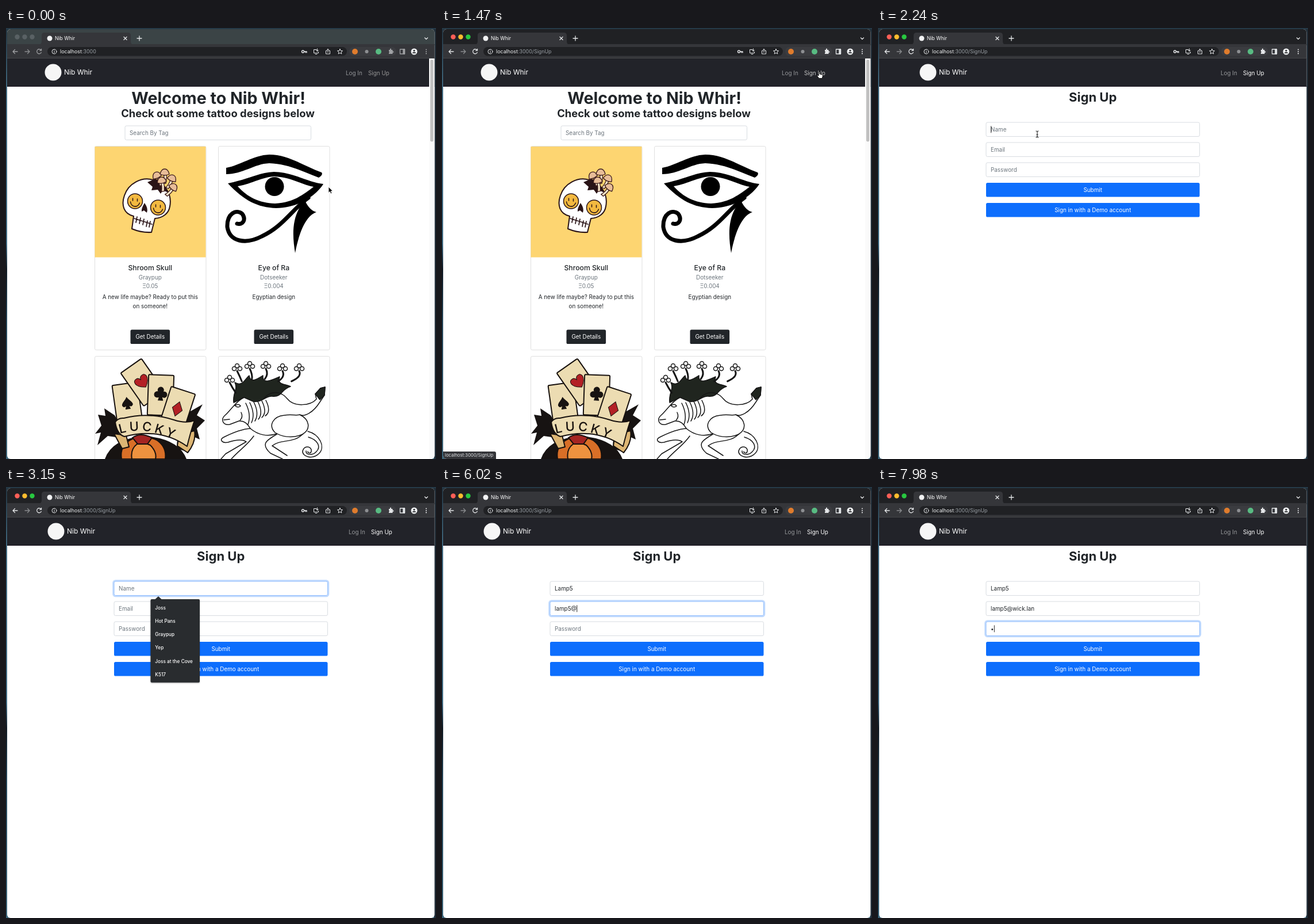
Recreate the animation shown at these times as an HTML page. Size 748 px wide and 749 px high, loop 8000 ms.

```html
<!DOCTYPE html>
<html lang="en">
<head>
<meta charset="utf-8">
<title>Nib Whir</title>
<style>
html, body { margin: 0; width: 100%; height: 100%; overflow: hidden; background: #1c2a34; }
svg { display: block; width: 748px; height: 749px; }
text { font: 9.9px Inter, "Open Sans", sans-serif; fill: #212529; white-space: pre; }
.mid { text-anchor: middle; }
.bold { font-weight: 700; }
.title { font-size: 12.2px; font-weight: 500; }
.muted { fill: #6c757d; }
.light { fill: #fff; }
.small { font-size: 8.25px; font-weight: 500; fill: #fff; }
.icon { fill: none; stroke: #e4e6e8; stroke-width: 1.3; stroke-linecap: round; stroke-linejoin: round; }
.field { fill: #fff; stroke: #ced4da; stroke-width: .8; }
.ink { fill: none; stroke: #161616; stroke-width: 1.5; stroke-linecap: round; stroke-linejoin: round; }
.paper { fill: #ecdcb2; stroke: #17110e; stroke-width: 2; stroke-linejoin: round; }
.line { fill: none; stroke: #2a1417; stroke-width: 2; stroke-linecap: round; stroke-linejoin: round; }
</style>
</head>
<body>
<svg id="stage" viewBox="0 0 748 749">
  <defs>
    <linearGradient id="desk" x2="0" y2="1">
      <stop offset="0" stop-color="#22333f"/><stop offset=".15" stop-color="#426b82"/>
      <stop offset=".5" stop-color="#3f6a83"/><stop offset=".56" stop-color="#121c25"/>
      <stop offset=".68" stop-color="#25465a"/><stop offset="1" stop-color="#3b6478"/>
    </linearGradient>
    <clipPath id="win"><rect x="2" y="2" width="743.5" height="747" rx="6"/></clipPath>
    <clipPath id="rowTwo"><rect x="154" y="571" width="410" height="178"/></clipPath>
    <path id="arc" d="M198 705Q250 688 316 727"/>
  </defs>
  <rect width="748" height="749" fill="url(#desk)"/>
  <rect x="745" width="3" height="749" fill="#202c36"/>
  <rect width="748" height="2" fill="#253947"/>

  <g clip-path="url(#win)">
    <rect width="748" height="749" fill="#fff"/>
    <rect id="strip" width="748" height="30" fill="#202124"/>
    <path d="M58 29Q62 28 62 23V13Q62 8 67 8H212Q217 8 217 13V23Q217 28 221 29Z" fill="#35363a"/>
    <rect y="28" width="748" height="25" fill="#35363a"/>
    <rect y="52.3" width="748" height=".7" fill="#4b4c50"/>
    <g id="lights"></g>
    <circle cx="76" cy="18" r="4.5" fill="#f2f3f4"/>
    <text x="85" y="21" class="light" style="font-size:8.6px">Nib Whir</text>
    <path class="icon" d="M205 15.5l5 5m0-5l-5 5M228 18h8m-4-4v8M728.500 17l2.500 2.500l2.500-2.500"/>
    <rect x="72" y="33" width="521" height="15.500" rx="7.700" fill="#202124"/>
    <rect x="597" y="33" width="82" height="15.500" rx="7.700" fill="#3b3c40"/>
    <g id="tools" class="icon">
      <path d="M20 41h-8m3.500-3.500L12 41l3.500 3.500"/>
      <path d="M61 38.500a4 4 0 1 0 .3 4M61.500 36.500v2.700h-2.700"/>
      <path d="M666 38h2q-.7-2.500 1-2.500t1 2.500h2.500v2.500q2-.5 2 1t-2 1V45H666v-2q1.800-1 0-2.500Z" fill="#e4e6e8" stroke="none"/>
      <rect x="685.500" y="37" width="8" height="8"/><path d="M691 37h2.500v8H691Z" fill="#e4e6e8"/>
      <path d="M731 37.500v.1m0 3.300v.1m0 3.300v.1" stroke-width="2"/>
    </g>
    <path class="icon" d="M33 41h8m-3.500-3.500L41 41l-3.500 3.500" style="stroke:#898b8e"/>
    <g class="icon" style="stroke-width:1">
      <circle cx="84" cy="41" r="4"/><path d="M84 40.500v2.500m0-4.300v.1"/>
      <path d="M540 37.500h-4.500v6h8v-2M538 45.500h3M541.500 36v4.500m-2-2l2 2l2-2"/>
      <path d="M558 39.500h-1.500v5.500h7v-5.500H562M560 42.500v-6m-2 2l2-2l2 2"/>
      <path d="M581 36.500l1.300 2.900l3.200.3l-2.400 2.100l.7 3.200l-2.800-1.700l-2.800 1.700l.7-3.200l-2.400-2.100l3.200-.3Z"/>
      <path id="key" d="M518.500 41h4.500v1.700m-2-1.700v1.700M518.500 41a2 2 0 1 0-4 0a2 2 0 1 0 4 0" stroke-width="1.400"/>
    </g>
    <circle cx="607" cy="41" r="5" fill="#df7c2d"/>
    <circle cx="627.500" cy="41" r="3" fill="#8d8f92"/>
    <circle cx="648" cy="41" r="5" fill="#58bb82"/>
    <circle cx="710" cy="41" r="5.500" fill="#f1f3f4"/>
    <circle cx="710" cy="39.300" r="1.600" fill="#35363a"/><path d="M707 44q0-2.300 3-2.300t3 2.300Z" fill="#35363a"/>
    <text x="94" y="44.300" style="font-size:8.900px;fill:#9aa0a6"><tspan fill="#f1f3f4">localhost</tspan>:3000<tspan id="path"></tspan></text>

    <rect y="53" width="748" height="49" fill="#222329"/>
    <rect y="101" width="748" height="1" fill="#1b141f"/>
    <g id="nav">
      <circle cx="82" cy="77" r="14.500" fill="#f6f6f6"/>
      <text x="101" y="81" class="light" style="font-size:12px">Nib Whir</text>
      <text x="591" y="81.500" style="fill:#949699">Log In</text>
      <text id="signLink" x="630" y="81.500">Sign Up</text>
    </g>

    <g id="home">
      <text x="369.500" y="132" class="mid bold" style="font-size:28.600px">Welcome to Nib Whir!</text>
      <text x="368.500" y="155" class="mid bold" style="font-size:18.400px">Check out some tattoo designs below</text>
      <rect class="field" x="207" y="170" width="323.500" height="24.500" rx="2.600"/>
      <text x="215" y="186" class="muted">Search By Tag</text>
      <g id="cards"></g>

      <rect x="154.500" y="206" width="193" height="192.500" fill="#fdd571"/>
      <path class="line" style="fill:#fff" d="M222 327C205 323 200 308 206 291C213 270 236 258 256 264C278 270 289 290 285 310C283 323 272 330 259 331L253 355Q236 356 219 349Z"/>
      <path d="M246 268l9 8l-2 6l11-1l5 7l4-6l9 4q-5-16-22-24Z" fill="#2a1417"/>
      <g id="shrooms"></g>
      <g id="smileys"></g>
      <path d="M241 304q-6 10-5 15l4-2l5 4q3-7-4-17Z" fill="#2a1417"/>
      <path class="line" style="stroke-width:1.700" d="M223 331Q239 336 254 341M228 328l-2 10m8-8l-2 10m8-8l-2 10m8-7l-2 10m7-9l-2 10"/>

      <path d="M383 254V243C407 239 430 221 458 220C490 220 515 238 549 251Q552 255 544 260C515 249 490 236 458 235C432 236 412 254 383 254Z"/>
      <path fill-rule="evenodd" d="M386 270C425 262 440 251 466 250C498 250 525 268 552 271C545 283 518 312 470 313C438 312 414 300 386 270ZM403 275C420 294 440 304 468 305C497 304 516 291 535 276C514 272 495 259 467 258C445 259 430 270 403 275Z"/>
      <circle cx="467" cy="275.500" r="16.500"/>
      <path d="M526 295C498 315 482 345 445 362C416 377 389 371 385 346C384 322 401 314 411 323C418 333 412 343 402 340" fill="none" stroke="#000" stroke-width="7" stroke-linecap="round"/>
      <path d="M520 300Q528 317 540 320C522 326 510 354 503 391C498 361 496 325 520 300Z"/>

      <g clip-path="url(#rowTwo)">
        <path d="M160 672l13 2l-2-13l18 12l14 24l-12 14l-14-2l-18 16l6-22l-10 2l11-14ZM300 672l18-14l3 8l21-12l-10 19l14 9l-14 14l5 19l-18-8l-8 28l-14-4Z" fill="#171312"/>
        <path d="M172 749q12-35 68-40q60 4 74 40Z" fill="#171312"/>
        <g id="hand"></g>
        <g fill="#d96f27" stroke="#17110e" stroke-width="2">
          <path d="M201 749q-4-25 19-35q20-8 42 2q18 12 15 33Z"/>
          <path d="M219 749q-3-17 9-26q12-4 23 2q12 12 9 24Z" fill="#ee923f"/>
          <path d="M220 712q13-10 34 0l-8 11h-17Z" fill="#a52522"/>
        </g>
        <path class="paper" style="fill:#ddb674" d="M188 705l14 26l12-3l-5-20ZM328 700q3 20-12 38l-18-12l3-20Z"/>
        <path class="paper" d="M190 685Q195 677 205 678Q247 667 292 681Q313 688 328 682Q323 695 315 727Q268 694 206 710Q193 706 190 685Z"/>
        <text style="font-size:22px;letter-spacing:5px;font-weight:500;fill:#17110e"><textPath href="#arc">LUCKY</textPath></text>

        <g class="ink">
          <path d="M396 651C394 633 404 628 398 616C412 624 415 610 423 604C425 618 437 610 447 604C445 620 463 612 476 606C471 621 485 618 495 623C479 627 481 642 463 640C451 639 447 651 430 649L414 642Z" fill="#20251f"/>
          <g id="tufts"></g>
          <path d="M414 642C400 648 391 665 380 674C373 681 378 691 389 689L405 683C415 682 420 688 425 696C438 707 455 711 471 705M398 656q7-4 10 1q-5 4-10-1M379 681l10-1M409 668q4 8-2 14"/>
          <path id="stripes"/>
          <path d="M449 643C464 628 480 633 489 644C501 659 529 657 540 645L538 636L547 626L555 624L554 638L546 650C534 669 519 676 511 672C528 680 531 697 516 706C496 715 477 709 468 703C456 691 464 675 484 673C497 671 505 674 511 672"/>
          <path d="M538 636L547 626L555 624L554 638L546 646Z" fill="#20251f"/>
          <path d="M425 696C409 697 393 704 379 711C370 715 376 722 386 720C401 715 411 714 418 719L382 740L374 749M431 709C420 725 406 733 392 749M516 706C500 722 478 714 463 726L489 743M471 706C452 717 443 723 460 739L481 749"/>
          <path d="M525 701C545 706 556 727 545 739C533 751 515 745 516 735C519 724 533 727 531 736C530 740 525 739 525 736M526 711C543 716 548 728 540 736C534 743 521 743 522 735"/>
        </g>
      </g>
      <rect x="736" y="53" width="10" height="696" fill="#fafafa"/>
      <rect x="738" y="55" width="5.500" height="142.500" rx="2.700" fill="#c1c1c1"/>
    </g>

    <g id="signup">
      <text x="373.700" y="127.500" class="mid bold" style="font-size:22px">Sign Up</text>
      <g id="fields"></g>
      <rect id="caret" width=".9" height="12" fill="#111"/>
      <g id="popups"></g>
    </g>

    <g id="status">
      <path d="M2 736H91Q94 736 94 739V749H2Z" fill="#35363a"/>
      <text x="5" y="745.300" style="font-size:7.750px;fill:#e2e4e6">localhost:3000/SignUp</text>
    </g>
  </g>

  <g id="cursor">
    <path id="arrow" d="M0 0V10.500L2.400 8.300L4 12L6 11.200L4.400 7.600H7.600Z" fill="#000" stroke="#fff" stroke-width=".9"/>
    <path id="pointer" d="M-.8-3.500q1.200-1.200 2 0V0l4.300 1q1 .5.800 2.500L5.300 7.500H-.2L-3.500 3q0-1.800 2.700-.3Z" fill="#fff" stroke="#000" stroke-width=".9"/>
    <path id="beam" d="M-2.500-5.500q2.500 0 2.500 1.500V4q0 1.500-2.500 1.500M2.500-5.500Q0-5.500 0-4V4q0 1.500 2.500 1.500M-1.500 1h3" fill="none" stroke="#222" stroke-width="1.100"/>
  </g>
</svg>
<script>
const LOOP = 8000;
const $ = id => document.getElementById(id);
const fill = (id, items, draw) => { $(id).innerHTML = items.map(draw).join(''); };
const show = (id, on) => { $(id).style.display = on ? '' : 'none'; };
const ramp = (t, from, to) => Math.min(1, Math.max(0, (t - from) / (to - from)));
const ease = p => p * p * (3 - 2 * p);
const mix = (a, b, p) => a + (b - a) * p;

fill('lights', ['#ff5f57', '#febc2e', '#28c840'], (c, i) =>
  `<circle cx="${19.5 + i * 13}" cy="15.500" r="4.200" fill="${c}"/>`);

const cards = [
  { x: 154.5, y: 205.5, name: 'Shroom Skull', by: 'Graypup', cost: '0.05', about: ['A new life maybe? Ready to put this', 'on someone!'] },
  { x: 369.5, y: 205.5, name: 'Eye of Ra', by: 'Dotseeker', cost: '0.004', about: ['Egyptian design'] },
  { x: 154.5, y: 570.5 }, { x: 369.5, y: 570.5 }
];
fill('cards', cards, c => {
  const mid = c.x + 96.3;
  const line = (y, s, cls = '') => `<text x="${mid}" y="${y}" class="mid ${cls}">${s}</text>`;
  const box = `<rect x="${c.x}" y="${c.y}" width="193.500" height="354" rx="2.600" fill="#fff" stroke="#dcdcdc" stroke-width=".9"/>`;
  if (!c.name) return box;
  return box + line(421, c.name, 'title') + line(436.7, c.by, 'muted') + line(451.5, 'Ξ' + c.cost, 'muted')
    + c.about.map((s, i) => line(471 + i * 15.6, s)).join('')
    + `<rect x="${mid - 34.3}" y="524.300" width="68.600" height="24.700" rx="2.600" fill="#212529"/>`
    + line(540.3, 'Get Details', 'light');
});

fill('shrooms', [[263, 258, -25], [276, 253, 0], [288, 263, 25], [271, 267, -8], [290, 278, 40]], ([x, y, a]) =>
  `<g transform="rotate(${a} ${x} ${y})" fill="#f9e8cb" stroke="#3b1b1b" stroke-width="1.300">
   <path d="M${x - 2} ${y}q2 8-1 17h5q2-9 1-17Z"/><path d="M${x - 8} ${y + 1}q2-9 8-9t8 9q-8 4-16 0Z" fill="#e8bd98"/></g>`);
fill('smileys', [[224.5, 301], [264.5, 312]], ([x, y]) =>
  `<g class="line" style="stroke-width:1.500"><circle cx="${x}" cy="${y}" r="13" fill="#f3b940"/>
   <path d="M${x - 4} ${y - 5}v4M${x + 4} ${y - 4}v4M${x - 8} ${y + 1}q1 7 7 8t9-6"/></g>`);

const suits = {
  spade: ['#171312', 'M0-10C3-4 9-2 9 3Q7 8 2 4L4 10H-4L-2 4Q-7 8-9 3C-9-2-3-4 0-10Z'],
  heart: ['#b32025', 'M0 11C-17 0-13-11-6-10Q-1-10 0-4Q1-10 6-10C13-11 17 0 0 11Z'],
  club: ['#171312', 'M-3-4A5 5 0 1 1 3-4A5 5 0 1 1 2 3L4 10H-4L-2 3A5 5 0 1 1-3-4Z'],
  diamond: ['#b32025', 'M0-13L9 0L0 13L-9 0Z']
};
fill('hand', [[211, 652, -8, 'spade'], [237, 615, -35, 'heart'], [269, 637, 2, 'club'], [298, 662, 18, 'diamond']], ([x, y, a, s]) =>
  `<g transform="translate(${x} ${y}) rotate(${a})"><rect class="paper" x="-22" y="-34" width="44" height="70" rx="2"/>
   <path d="${suits[s][1]}" fill="${suits[s][0]}" stroke="#17110e"/></g>`);

fill('tufts', [[402, 592], [424, 588], [452, 588], [481, 592], [389, 612], [510, 592]], ([x, y]) =>
  `<path d="M${mix(x, 443, .2)} ${y + 22}Q${x + 5} ${y + 14} ${x} ${y + 4}" stroke-width="3"/>
   <g fill="#fff"><circle cx="${x - 5}" cy="${y}" r="3.500"/><circle cx="${x + 5}" cy="${y}" r="3.500"/><circle cx="${x}" cy="${y - 5}" r="3.500"/></g>`);
$('stripes').setAttribute('d', Array.from({ length: 6 }, (_, i) =>
  `M${417 + i * 7} ${652 - i}q10 20 ${4 - i} ${37 - i * 2}`).join(''));

const fields = [
  { hint: 'Name', y: 164, keys: 'Lamp5', times: [3220, 3360, 3500, 3570, 3990], on: 2250, off: 4200 },
  { hint: 'Email', y: 199, keys: 'lamp5@wick.lan', on: 4200, off: 7700,
    times: [4550, 4690, 4830, 4970, 5460, 6020, 6440, 6580, 6720, 6790, 7000, 7280, 7490, 7560] },
  { hint: 'Password', y: 234, keys: '•', times: [7980], on: 7700, off: 9000 }
];
fill('fields', fields, (f, i) =>
  `<rect class="field" x="188" y="${f.y}" width="371.500" height="24.500" rx="2.600"/>
   <g id="ring${i}"><rect x="186.500" y="${f.y - 1.5}" width="374.500" height="27.500" rx="4" fill="none" stroke="#c2dbfe" stroke-width="2.600"/>
   <rect x="188" y="${f.y}" width="371.500" height="24.500" rx="2.600" fill="#fff" stroke="#86b7fe" stroke-width=".9"/></g>
   <text id="value${i}" x="196" y="${f.y + 16}"></text>`);
['Submit', 'Sign in with a Demo account'].forEach((label, i) => {
  const y = 269 + i * 35;
  $('fields').innerHTML += `<rect x="188" y="${y}" width="371.500" height="24.500" rx="2.600" fill="#0d6efd"/>
    <text x="373.700" y="${y + 16}" class="mid light">${label}</text>`;
});

const popups = [
  { y: 195, w: 85.5, from: 2450, to: 3220, items: ['Joss', 'Hot Pans', 'Graypup', 'Yep', 'Joss at the Cove', 'K517'] },
  { y: 195, w: 92, from: 3220, to: 3360, items: ['Lark', 'Lantern at the Bay'] },
  { y: 230, w: 100, from: 4550, to: 4690, items: ['lark3@wick.lan', 'lantern4@wick.lan'] }
];
fill('popups', popups, (p, i) =>
  `<g id="popup${i}" style="filter:drop-shadow(0 1px 1px #0005)">
   <path d="M259 ${p.y + .5}l6-5.500l6 5.500Z" fill="#292c2f"/>
   <rect x="251.500" y="${p.y}" width="${p.w}" height="${p.items.length * 23.3 + 5}" rx="2" fill="#292c2f"/>
   ${p.items.map((s, k) => `<text class="small" x="259.300" y="${p.y + 17.5 + k * 23.3}">${s}</text>`).join('')}</g>`);

function drawCursor(t) {
  const out = ease(ramp(t, 40, 720)), back = ease(ramp(t, 1520, 2170));
  const x = mix(mix(561, 656, out), 277, back);
  const y = mix(mix(276, 80, out), 184.5, back);
  const beam = t > 1540 && x < 559 && y > 164;
  const hand = t >= 1050 && t < 1540;
  $('cursor').setAttribute('transform', `translate(${x} ${y})`);
  show('beam', beam);
  show('pointer', hand);
  show('arrow', !hand && !beam);
  show('cursor', t < 3150);
}

function drawFields(t) {
  fields.forEach((f, i) => {
    const typed = f.keys.slice(0, f.times.filter(k => t >= k).length);
    const value = $('value' + i);
    value.textContent = typed || f.hint;
    value.style.fill = typed ? '#212529' : '#6c757d';
    $('ring' + i).style.opacity = ramp(t, f.on, f.on + 150) - ramp(t, f.off, f.off + 150);
    if (t >= f.on || i === 0) {
      $('caret').setAttribute('x', 196.3 + (typed ? value.getComputedTextLength() : 0));
      $('caret').setAttribute('y', f.y + 6.3);
    }
  });
  show('caret', t >= 2230 && !(t >= 2800 && t < 3220));
  popups.forEach((p, i) => show('popup' + i, t >= p.from && t < p.to));
}

function draw(t) {
  const active = t >= 840, second = t >= 1540;
  $('strip').style.fill = active ? '#202124' : '#3b4446';
  [...$('lights').children].forEach(c => { c.style.fill = active ? '' : '#596164'; });
  $('tools').style.opacity = active ? 1 : .6;
  $('path').textContent = t >= 1400 ? '/SignUp' : '';
  $('nav').setAttribute('transform', `translate(${second ? 5 : 0} 0)`);
  const tone = second ? 255 : Math.round(mix(150, 196, ramp(t, 1030, 1190)));
  $('signLink').style.fill = `rgb(${tone},${tone},${tone})`;
  show('home', !second);
  show('signup', second);
  show('status', t >= 910 && !second);
  show('key', t < 3220);
  drawCursor(t);
  drawFields(t);
}

const start = performance.now();
function tick() {
  draw((performance.now() - start) % LOOP);
  requestAnimationFrame(tick);
}
tick();
</script>
</body>
</html>
```
